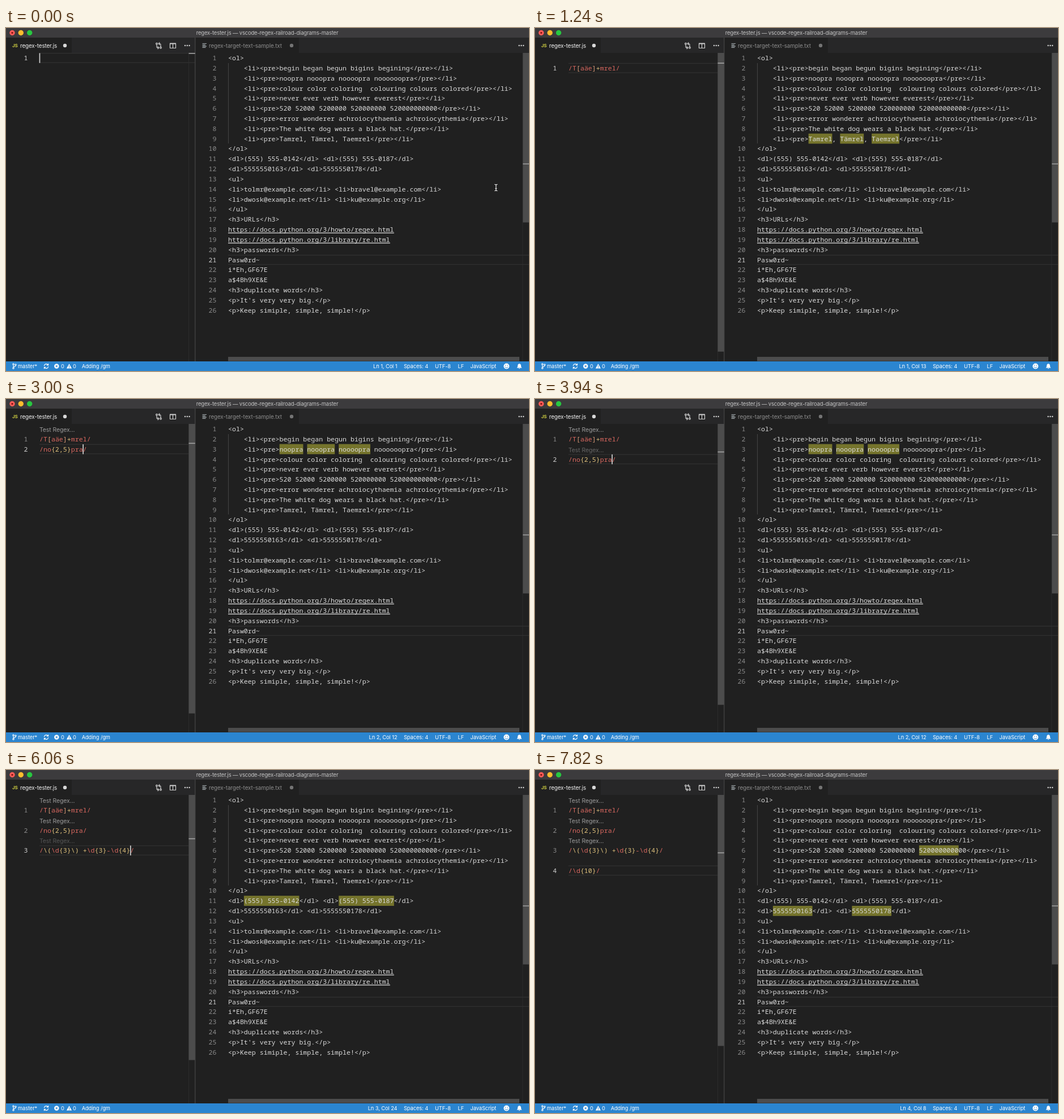
These frames come from a looping animation (923x606 px, 8 s). An HTML page:

```html
<!DOCTYPE html>
<html lang="en">
<head>
<meta charset="utf-8">
<title>Regex tester</title>
<style>
html, body { margin: 0; width: 100%; height: 100%; overflow: hidden; background: #202020; }
svg { display: block; width: 923px; height: 606px; }
text { white-space: pre; }
.code { font: 500 11.62px "Noto Sans Mono", "DejaVu Sans Mono", monospace; fill: #dadada; }
.ui { font-family: Inter, "Open Sans", sans-serif; letter-spacing: -0.01em; }
.num { font-weight: 400; fill: #8a8a8a; text-anchor: end; }
.now { fill: #d0d0d0; }
.lens { font-size: 10.5px; fill: #999; }
.status { font-size: 9.3px; fill: #fff; }
.line { fill: none; stroke-linecap: round; stroke-linejoin: round; }
.rx { fill: #d9675f; }
.set { fill: #d79a78; }
.esc { fill: #dec07c; }
</style>
</head>
<body>
<svg id="stage" viewBox="0 0 923 606" xmlns="http://www.w3.org/2000/svg">
  <rect width="923" height="606" fill="#202020"/>

  <!-- title bar -->
  <rect width="923" height="17" fill="#3c3b3d"/>
  <circle cx="11" cy="8.5" r="4.7" fill="#fc5b57"/>
  <circle cx="11" cy="8.5" r="1.6" fill="#7a0f0c"/>
  <circle cx="26.3" cy="8.5" r="4.7" fill="#fdbc2e"/>
  <circle cx="41.7" cy="8.5" r="4.7" fill="#28c840"/>
  <text class="ui" x="461" y="12" text-anchor="middle" font-size="9.5" style="letter-spacing:-.02em" fill="#c4c4c4">regex-tester.js — vscode-regex-railroad-diagrams-master</text>

  <!-- tabs -->
  <rect y="17" width="923" height="27" fill="#272728"/>
  <rect y="17" width="116" height="27" fill="#202020"/>
  <rect x="334" y="17" width="183" height="27" fill="#202020"/>
  <g class="ui" font-size="9.8">
    <text x="11" y="34.3" font-size="8" font-weight="700" fill="#cbcb41">JS</text>
    <text x="25" y="34.8" fill="#f4f4f4">regex-tester.js</text>
    <text x="358" y="34.8" fill="#8c8c8c">regex-target-text-sample.txt</text>
  </g>
  <circle cx="104" cy="31" r="3.2" fill="#d8d8d8"/>
  <circle cx="504" cy="31" r="3.2" fill="#747474"/>
  <path class="line" stroke="#a8b0b4" stroke-width="1.2" d="M347 27.5h6.5M347 29.8h4.5M347 32.1h6.5M347 34.4h5"/>
  <g class="line" stroke="#cfcfcf" stroke-width="1.2">
    <circle cx="266" cy="27.7" r="1.4"/>
    <circle cx="273" cy="34.8" r="1.4"/>
    <path d="M266 29.3v3.6q0 2 2 2h1.5M268 33l1.8 1.9-1.8 1.9M273 33.2v-3.6q0-2-2-2h-1.5M271 25.7l-1.8 1.9 1.8 1.9"/>
    <path d="M289.5 27h10v8.5h-10zM289.5 28h10M294.5 28v7"/>
  </g>
  <g fill="#d4d4d4">
    <circle cx="316" cy="31" r="1.2"/><circle cx="319.8" cy="31" r="1.2"/><circle cx="323.6" cy="31" r="1.2"/>
    <circle cx="905.6" cy="31" r="1.2"/><circle cx="909.4" cy="31" r="1.2"/><circle cx="913.2" cy="31" r="1.2"/>
  </g>

  <!-- editors -->
  <path d="M322.5 44V589M911.8 44V589" stroke="#2b2b2b"/>
  <path d="M333.8 17V589" stroke="#474747" stroke-width="1.2"/>
  <path d="M392 401.4H923M392 417.6H923" stroke="#303030" stroke-width="1.3"/>
  <path d="M392.5 62V204" stroke="#444"/>
  <g id="marks" fill="#75742c"></g>
  <g id="doc" class="code"></g>
  <rect x="912.2" y="44" width="10.8" height="299.5" fill="#4c4c4c"/>
  <rect x="912.2" y="239.3" width="10.8" height="1.7" fill="#969696"/>
  <rect x="392" y="581" width="514" height="7.5" fill="#4c4c4c"/>
  <g id="left"></g>
  <rect id="bar" x="322.5" y="44" width="11.3" fill="#4c4c4c"/>
  <rect id="tick" x="322.5" width="11.3" height="1.7" fill="#a0a0a0"/>
  <rect id="caret" width="1.7" height="17.4" fill="#d0d0d0"/>

  <!-- status bar -->
  <rect y="589" width="923" height="17" fill="#2b85d0"/>
  <g class="line" stroke="#fff" stroke-width="1.1">
    <circle cx="13" cy="594" r="1.2"/><circle cx="13" cy="601" r="1.2"/><circle cx="17" cy="595" r="1.2"/>
    <path d="M13 595.3v4.4M17 596.3q0 2-4 2.6"/>
    <path d="M67.4 596.6a3.7 3.7 0 0 1 6.8-1.2M74.6 598.4a3.7 3.7 0 0 1-6.8 1.2M74.6 593.2v2.5h-2.5M67.4 601.8v-2.5h2.5"/>
  </g>
  <circle cx="89.3" cy="597.5" r="4.2" fill="#fff"/>
  <path d="M87.7 595.9l3.2 3.2M90.9 595.9l-3.2 3.2" stroke="#2b85d0" stroke-width="1.1"/>
  <path d="M111.5 593.3l4.6 8.3h-9.2z" fill="#fff"/>
  <path d="M111.5 596.2v2.6M111.5 599.6v1.1" stroke="#2b85d0" stroke-width="1.1"/>
  <g class="ui status">
    <text x="21" y="600.9">master*</text>
    <text x="97" y="600.9">0</text>
    <text x="118" y="600.9">0</text>
    <text x="133.7" y="600.9">Adding /gm</text>
    <text id="pos" x="690.5" y="600.9" text-anchor="end"></text>
    <text x="702" y="600.9">Spaces: 4</text>
    <text x="757" y="600.9">UTF-8</text>
    <text x="797.5" y="600.9">LF</text>
    <text x="819.5" y="600.9">JavaScript</text>
  </g>
  <circle cx="883.3" cy="597.5" r="5" fill="#fff"/>
  <g fill="#2b85d0"><circle cx="881.5" cy="596" r=".8"/><circle cx="885.1" cy="596" r=".8"/></g>
  <path class="line" d="M880.5 598.8q2.8 3.2 5.6 0" stroke="#2b85d0"/>
  <path d="M901.5 600.5q1.6-1.2 1.6-3.8q0-3.4 2.9-3.8q2.9.4 2.9 3.8q0 2.6 1.6 3.8zM904.6 601.2h2.8q-1.4 2-2.8 0z" fill="#fff"/>

  <path id="mouse" class="line" d="M-2.1-5.6Q0-5.6 0-4.2Q0-5.6 2.1-5.6M0-4.2V4.2M-2.1 5.6Q0 5.6 0 4.2Q0 5.6 2.1 5.6M-1.1 1.6H1.1" stroke="#e4e4e4" stroke-width="1.2"/>
</svg>
<script>
const NS = "http://www.w3.org/2000/svg";
const LOOP = 8000, TOP = 44, ROW = 17.82, CHAR = 6.972, VIEW = 545;
const LEFT = 59, RIGHT = 392;

const doc = `<ol>
    <li><pre>begin began begun bigins begining</pre></li>
    <li><pre>noopra nooopra noooopra noooooopra</pre></li>
    <li><pre>colour color coloring  colouring colours colored</pre></li>
    <li><pre>never ever verb however everest</pre></li>
    <li><pre>520 52000 5200000 520000000 520000000000</pre></li>
    <li><pre>error wonderer achroiocythaemia achroiocythemia</pre></li>
    <li><pre>The white dog wears a black hat.</pre></li>
    <li><pre>Tamrel, Tämrel, Taemrel</pre></li>
</ol>
<dl>(555) 555-0142</dl> <dl>(555) 555-0187</dl>
<dl>5555550163</dl> <dl>5555550178</dl>
<ul>
<li>tolmr@example.com</li> <li>bravel@example.com</li>
<li>dwosk@example.net</li> <li>ku@example.org</li>
</ul>
<h3>URLs</h3>
https://docs.python.org/3/howto/regex.html
https://docs.python.org/3/library/re.html
<h3>passwords</h3>
Pasw0rd~
i*Eh,GF67E
a$4Bh9XE&E
<h3>duplicate words</h3>
<p>It's very very big.</p>
<p>Keep simiple, simple, simple!</p>`.split("\n");

// Times: pasted, pushed down by its lens, lens fading in.
const rules = [
  { src: "T[aäe]+mrel", at: 820, push: 1180, fade: 1530 },
  { src: "no{2,5}pra", at: 3000, push: 3410, fade: 3760 },
  { src: "\\(\\d{3}\\) +\\d{3}-\\d{4}", at: 5240, push: 5590, fade: 5940 },
  { src: "\\d{10}", at: 7470, push: 7820, fade: 8170 }
];

// The caret flips at each of these, starting visible.
const blinks = [350, 590, 1240, 1530, 1940, 2290, 2650, 3000, 3410, 3760,
  4120, 4470, 4880, 5240, 5590, 5940, 6350, 6710, 7060, 7470, 7820];

const $ = id => document.getElementById(id);

function add(parent, tag, attrs, text) {
  const el = document.createElementNS(NS, tag);
  set(el, attrs);
  if (text !== undefined) el.textContent = text;
  parent.appendChild(el);
  return el;
}

function set(el, attrs) {
  for (const k in attrs) el.setAttribute(k, attrs[k]);
}

const show = (el, on) => el.setAttribute("visibility", on ? "visible" : "hidden");
const rowTop = row => TOP + row * ROW;
const baseline = row => rowTop(row) + 13.1;

function tokenClass(s) {
  if (/^(\{|\+|\\[()])/.test(s)) return "esc";
  return /^[[\]]$/.test(s) ? "set" : "rx";
}

doc.forEach((line, i) => {
  const y = baseline(i);
  add($("doc"), "text", { x: 371.5, y, class: i === 20 ? "num now" : "num" }, i + 1);
  add($("doc"), "text", { x: RIGHT, y }, line);
  if (line.startsWith("http"))
    add($("doc"), "rect", { x: RIGHT, y: y + 1.4, width: line.length * CHAR, height: 1.3 });
});

const borders = [0, 1].map(() =>
  add($("left"), "rect", { x: LEFT, width: 274, height: 1.3, fill: "#303030" }));
const first = add($("left"), "text", { x: 38.5, y: baseline(0), class: "code num now" }, 1);

rules.forEach((r, i) => {
  r.num = i ? add($("left"), "text", { x: 38.5 }, i + 1) : first;
  r.code = add($("left"), "text", { x: LEFT, class: "code" });
  for (const s of `/${r.src}/`.match(/\{[^}]*\}|\\.|[[\]+]|[^\\{[\]+]/g))
    add(r.code, "tspan", { class: tokenClass(s) }, s);
  r.lens = add($("left"), "text", { x: LEFT, y: rowTop(2 * i) + 14.2, class: "ui lens" }, "Test Regex...");
  r.marks = add($("marks"), "g", {});
  doc.forEach((line, n) => {
    for (const m of line.matchAll(new RegExp(r.src, "g")))
      add(r.marks, "rect", { x: RIGHT + m.index * CHAR, y: rowTop(n), width: m[0].length * CHAR, height: ROW });
  });
});

function draw(t) {
  const cur = rules.filter(r => t >= r.at).length - 1;
  let row = 0;
  rules.forEach((r, i) => {
    const on = i <= cur;
    const own = 2 * i + (t >= r.push ? 1 : 0);
    if (i === cur) row = own;
    show(r.code, on);
    show(r.num, on || i === 0);
    show(r.marks, i === cur);
    set(r.code, { y: baseline(own) });
    set(r.num, { y: baseline(own), class: i === Math.max(cur, 0) ? "code num now" : "code num" });
    const step = Math.floor((t - r.fade) / 60) + 1;
    set(r.lens, { opacity: Math.max(0, Math.min(1, step / 7)) });
  });

  const total = VIEW + row * ROW;
  set($("bar"), { height: VIEW * VIEW / total });
  show($("bar"), row > 0);
  set($("tick"), { y: TOP + row * ROW * VIEW / total });
  borders.forEach((b, i) => set(b, { y: rowTop(row) + (i ? ROW - 1.3 : 0) }));

  const col = cur < 0 ? 1 : rules[cur].src.length + 2;
  $("pos").textContent = `Ln ${Math.max(cur, 0) + 1}, Col ${col}`;
  set($("caret"), { x: LEFT - 0.4 + (col - 1) * CHAR, y: rowTop(row) + 0.4 });
  show($("caret"), blinks.filter(b => t >= b).length % 2 === 0);

  set($("mouse"), { transform: t < 120 ? "translate(864.8 282)" : "translate(896.5 267)" });
  show($("mouse"), t < 180);
}

const start = performance.now();
function tick() {
  draw((performance.now() - start) % LOOP);
  requestAnimationFrame(tick);
}
tick();
</script>
</body>
</html>
```
